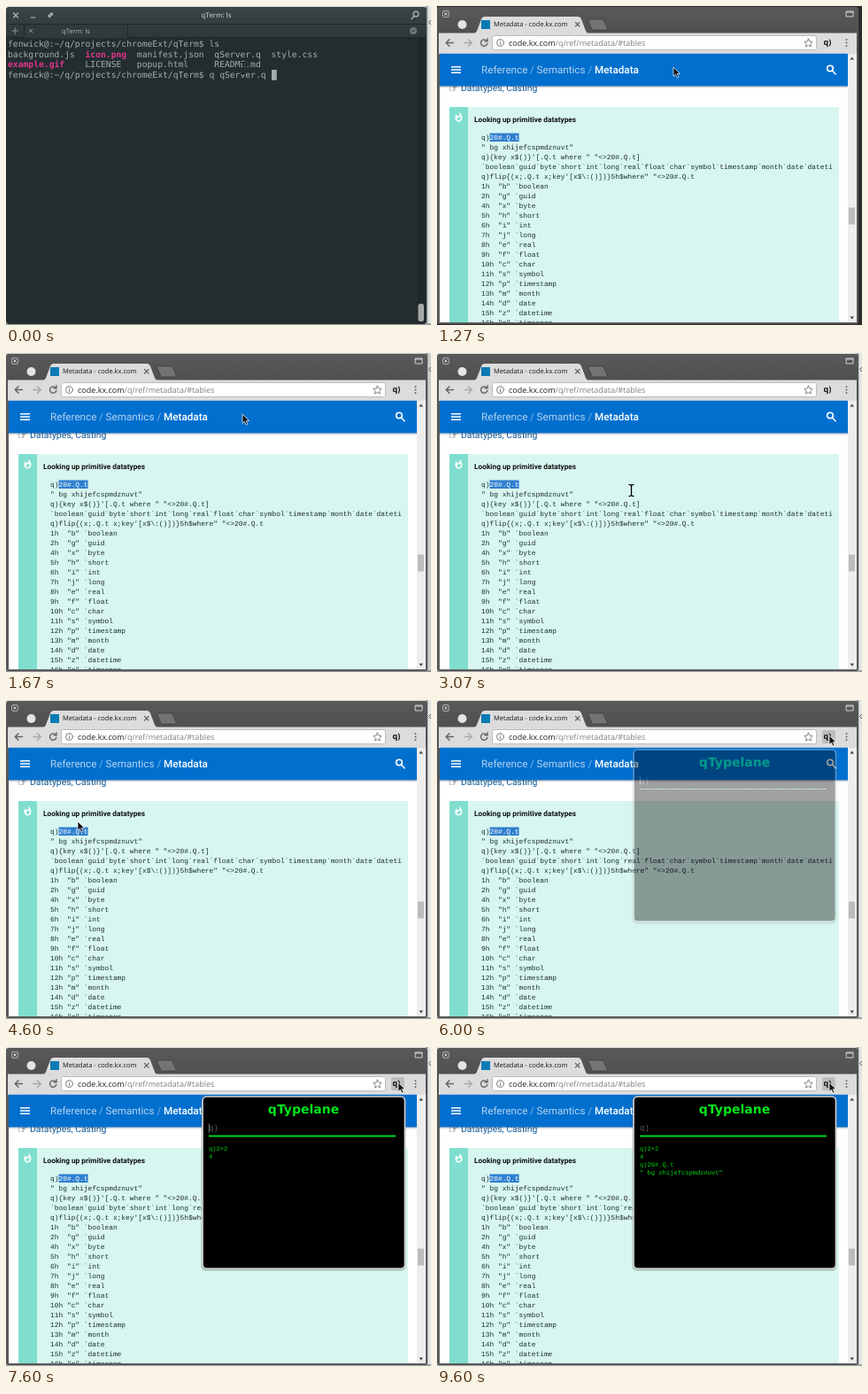
An HTML page for the animation above (9.99 s loop, 480x360 px).

```html
<!DOCTYPE html>
<html lang="en">
<head>
<meta charset="utf-8">
<title>Terminal and browser</title>
<style>
html, body { margin: 0; height: 100%; overflow: hidden; background: #e4e6e6; }
svg { display: block; width: 480px; height: 360px; }
text { white-space: pre; text-rendering: geometricPrecision; }
.ui { font-family: "Open Sans", sans-serif; }
.doc { font-family: Roboto, sans-serif; }
.term { font: 9.7px "DejaVu Sans Mono", monospace; fill: #a3adab; }
.code { font: 7.88px "Liberation Mono", monospace; fill: #1f2d33; }
.out { font: 7.12px "Liberation Mono", monospace; fill: #00d812; }
.line { fill: none; stroke-linecap: round; }
</style>
</head>
<body>
<svg viewBox="0 0 480 360">
  <defs>
    <linearGradient id="bar" x2="0" y2="1"><stop stop-color="#3b4546"/><stop offset="1" stop-color="#2d3739"/></linearGradient>
    <linearGradient id="frame" x2="0" y2="1"><stop stop-color="#595959"/><stop offset="1" stop-color="#484848"/></linearGradient>
    <linearGradient id="shade" x2="0" y2="1"><stop stop-opacity=".25"/><stop offset="1" stop-opacity="0"/></linearGradient>
    <clipPath id="codeBox"><path d="M42 114H446.500V357H42z"/></clipPath>
    <path id="beamShape" d="M-2.500-6.500Q0-6.500 0-5V5Q0 6.500-2.500 6.500M2.500-6.500Q0-6.500 0-5M0 5Q0 6.500 2.500 6.500"/>
  </defs>
  <rect width="480" height="360" fill="#e4e6e6"/>
  <path d="M474 0h2.500v360h-2.500zM0 358h480v2H0z" fill="#9da1a1"/>
  <path d="M480 16l-2.500 2.500 2.500 2.500" class="line" stroke="#555"/>
  <rect id="backdrop" width="480" height="360" fill="#2b2b2b"/>

  <g id="terminal">
    <rect y="1" width="475" height="358" rx="4" fill="#232d30"/>
    <path d="M0 36V5Q0 1 4 1H471Q475 1 475 5V36z" fill="url(#bar)"/>
    <path d="M0 20.500H475M0 35.500H20M137.500 35.500H475M20.500 21V36M137.500 21V36" stroke="#1f2829" fill="none"/>
    <path d="M21 21h116v15H21z" fill="#303a3c"/>
    <g class="line" stroke="#b4bab8" stroke-width="1.200">
      <path d="M8.500 8l5 5M13.500 8l-5 5M28 13h5M48.500 12l3.500-3.500M50 8.300h2.200v2.200M48.300 10v2.200h2.200"/>
      <circle cx="463" cy="9" r="2.900"/><path d="M461 11.500l-3 3"/>
      <path stroke="#8b9391" stroke-width="1" d="M7 28h6.500M10.200 25v6.500M26 26l4 4M30 26l-4 4"/>
    </g>
    <circle cx="460" cy="28" r="4" fill="#707877"/><path d="M458 27l2 2 2-2" class="line" stroke="#303a3c"/>
    <g class="ui" fill="#b4bab8" text-anchor="middle">
      <text id="title" x="237.500" y="13.300" font-size="7.800" font-weight="600"></text>
      <text id="tab" x="79" y="30.600" font-size="7.500"></text>
    </g>
    <path d="M465 36h9v321h-9z" fill="#1f282b"/>
    <rect x="465.500" y="336" width="6.500" height="20" rx="2.500" fill="#a4a9a8"/>
    <g id="shell" class="term"></g>
    <rect id="block" width="5.800" height="11.700" fill="#a3adab"/>
  </g>

  <g id="browser">
    <rect y="1" width="476" height="358" rx="3" fill="#595959"/>
    <rect x="1" y="2" width="474" height="52" rx="3" fill="url(#frame)"/>
    <g class="line" stroke="#d0d0d0">
      <rect x="6.500" y="5.500" width="7" height="7" rx="1.500" stroke="#aaa"/><path d="M8.500 7.500l3 3M11.500 7.500l-3 3"/>
      <path d="M462.500 6h7.500v6h-7.500zM462.500 7h7.500"/>
    </g>
    <circle cx="28.500" cy="21" r="5" fill="#e4e4e4"/>
    <path d="M172 15h14q1.500 0 2 1l4 9q.5 2-1 2h-14q-1.500 0-2-1l-4-9q-.5-2 1-2z" fill="#747474" stroke="#3c3c3c" stroke-width=".7"/>
    <path d="M41 31q3 0 4-3l5-13q1-3 4-3H159q3 0 4 3l5 13q1 3 4 3z" fill="#dcdcdc"/>
    <path d="M2 30.500H474V54H2z" fill="#dcdcdc"/>
    <rect x="50" y="16" width="10" height="10" fill="#0b7bb5"/>
    <text class="ui" x="64" y="23.300" font-size="7.500" fill="#1a1a1a">Metadata - code.kx.com</text>
    <g class="line" stroke="#666" stroke-width="1.200">
      <path d="M156.500 18.500l4.500 4.500M161 18.500l-4.500 4.500"/>
      <path d="M18.500 41.500h-8M14 37.800l-3.700 3.700 3.700 3.700" stroke-width="1.500"/>
      <path d="M31 41.500h8M35.500 37.800l3.700 3.700-3.700 3.700" stroke="#aaa" stroke-width="1.500"/>
      <path d="M56.300 39.500a3.700 3.700 0 1 0 .5 3M57 36.800v3h-3" stroke-width="1.400"/>
    </g>
    <rect x="62.500" y="33.500" width="366" height="16" rx="2" fill="#fff" stroke="#bcbcbc"/>
    <g class="line" stroke="#777"><circle cx="71.500" cy="41.500" r="4"/><path d="M71.500 41.300v2.200M71.500 39.400v.1"/></g>
    <text class="ui" x="81" y="44.700" font-size="9" fill="#222">code.kx.com<tspan fill="#808080">/q/ref/metadata/#tables</tspan></text>
    <path d="M419.500 37l1.400 3 3.300.4-2.400 2.300.6 3.300-2.900-1.600-2.900 1.600.6-3.300-2.400-2.300 3.300-.4z" class="line" stroke="#777" stroke-width=".9"/>
    <rect id="pressed" x="435" y="34" width="15" height="15" rx="2" fill="#bdbdbd"/>
    <text class="ui" x="436.500" y="44.300" font-size="9" font-weight="700" fill="#111">q)</text>
    <g fill="#666"><circle cx="462.500" cy="38" r="1"/><circle cx="462.500" cy="41.500" r="1"/><circle cx="462.500" cy="45" r="1"/></g>

    <path d="M3 54H464V357H3z" fill="#fff"/>
    <path d="M464 54H474V357H464z" fill="#ededed"/>
    <path d="M465 227.500h7v19h-7z" fill="#bcbcbc"/>
    <path d="M466.500 60.500l2.300-3 2.300 3zM466.500 350.500l2.300 3 2.300-3z" fill="#444"/>
    <text x="13" y="97" font-size="13" font-family="DejaVu Sans, sans-serif" fill="#111">☞</text>
    <text class="doc" x="27" y="96.300" font-size="10.400" fill="#125a96">Datatypes, Casting</text>
    <path d="M3 53.700H464V90.400H3z" fill="#006fce"/>
    <path d="M3 90.400H464V93H3z" fill="url(#shade)"/>
    <path d="M16 68h11v1.500H16zM16 71.300h11v1.500H16zM16 74.600h11v1.500H16z" fill="#fff"/>
    <g class="line" stroke="#fff" stroke-width="1.600"><circle cx="444" cy="70.500" r="3.300"/><path d="M446.500 73l3.500 3.800"/></g>
    <g class="doc" font-size="11.700" fill="#b3d4f0">
      <text x="50" y="76">Reference</text><text x="105" y="76" opacity=".7">/</text>
      <text x="112.500" y="76">Semantics</text><text x="170.500" y="76" opacity=".7">/</text>
      <text x="178" y="76" fill="#fff" font-weight="500">Metadata</text>
    </g>
    <path d="M14 114H454V357H14z" fill="#d7f6ef"/>
    <path d="M14 114H35V357H14z" fill="#80decf"/>
    <path transform="translate(18.500 119.500) scale(.5)" fill="#fff" d="M13.500.67s.74 2.650.74 4.800c0 2.060-1.350 3.730-3.410 3.730-2.070 0-3.630-1.670-3.630-3.730l.03-.36C5.210 7.510 4 10.620 4 14c0 4.420 3.580 8 8 8s8-3.580 8-8C20 8.610 17.410 3.800 13.500.67zM11.710 19c-1.780 0-3.220-1.400-3.220-3.140 0-1.620 1.050-2.760 2.810-3.120 1.770-.36 3.600-1.210 4.620-2.580.39 1.290.59 2.650.59 4.040 0 2.650-2.150 4.800-4.800 4.800z"/>
    <text class="doc" x="42" y="130.500" font-size="8.300" font-weight="700" fill="#111">Looking up primitive datatypes</text>
    <g clip-path="url(#codeBox)">
      <rect id="mark" y="143.500" height="9.500" fill="#2f7fcf"/>
      <g id="code" class="code"></g>
    </g>

    <g id="popup">
      <rect x="220.500" y="55.500" width="231" height="197" rx="5" opacity=".22"/>
      <rect x="222" y="56" width="228.500" height="194" rx="4.500" stroke="#d0d0d0" stroke-width="1.700"/>
      <text x="336" y="74.500" text-anchor="middle" font-family="DejaVu Sans, sans-serif" font-weight="700" font-size="14" fill="#00e61a">qTypelane</text>
      <text id="field" x="229" y="94.300" font-size="9" font-family="Liberation Mono, monospace"></text>
      <path id="caret" d="M0 86.500V96.500" stroke="#8a9a8a" stroke-width=".9"/>
      <path id="rule" d="M229 100.500H440"/>
      <g id="out" class="out"></g>
    </g>
  </g>

  <path id="arrow" d="M0 0V10.300L2.400 8.200 4.100 12 5.900 11.200 4.200 7.500H7.500z" fill="#111" stroke="#fff" stroke-width=".7"/>
  <g id="beam" class="line">
    <use href="#beamShape" stroke="#fff" stroke-width="2.200" opacity=".35"/>
    <use href="#beamShape" stroke="#000" stroke-width="1.300"/>
  </g>
</svg>
<script>
const LOOP = 9990, STEP = 200 / 3, TERM_W = 5.843, TERM_H = 11.7, CODE_W = 4.73;
const $ = id => document.getElementById(id);
const escape = s => s.replace(/&/g, '&amp;').replace(/</g, '&lt;');
const clamp = k => Math.min(1, Math.max(0, k));
const rows = (lines, x, y, pitch) =>
  lines.map((s, i) => `<text x="${x}" y="${y + i * pitch}">${s}</text>`).join('');
const show = (id, on) => $(id).style.display = on ? '' : 'none';
const place = (id, x, y) => $(id).setAttribute('transform', `translate(${x} ${y})`);
const pink = s => `<tspan fill="#e0358a" font-weight="700">${s}</tspan>`;

const prompt = 'fenwick@:~/q/projects/chromeExt/qTerm$ ';
const shellLines = [
  prompt + 'ls',
  `background.js  ${pink('icon.png')}  manifest.json  qServer.q  style.css`,
  `${pink('example.gif')}    LICENSE   popup.html     README.md`,
  prompt + 'q qServer.q ',
  'KDB+ 3.5 2017.04.10 Copyright (C) 1993-2017 Kx Systems',
  'l32/ 4()core 7870MB fenwick fenwick-laptop 127.0.1.1 NONEXPIRE',
  '',
  'Welcome to kdb+ 32bit edition',
  'For support please see http://groups.google.com/d/forum/personal-kdbplus',
  'Tutorials can be found at http://code.kx.com/wiki/Tutorials',
  'To exit, type \\\\',
  'To remove this startup msg, edit q.q',
  'q)'
];

const types = 'boolean guid byte short int long real float char symbol timestamp month date datetime timespan'.split(' ');
const typeIds = [1, 2, 4, 5, 6, 7, 8, 9, 10, 11, 12, 13, 14, 15, 16];
const codeLines = [
  'q)20#.Q.t',
  '" bg xhijefcspmdznuvt"',
  'q){key x$()}\'[.Q.t where " "<>20#.Q.t]',
  types.map(s => '`' + s).join(''),
  'q)flip{(x;.Q.t x;key\'[x$\\:()])}5h$where" "<>20#.Q.t',
  ...types.map((s, i) => `${(typeIds[i] + 'h').padEnd(4)}"${'bgxhijefcspmdzn'[i]}" \`${s}`)
].map(escape);

$('code').innerHTML = rows(codeLines, 50, 150.8, 11.03);
$('code').firstChild.innerHTML = 'q)<tspan id="chosen">20#.Q.t</tspan>';

// Pointer path: time, x, y
const path = [
  [0, 267, 69], [2470, 267, 69], [2670, 310, 82], [2800, 336, 112], [3070, 220, 155],
  [3300, 56, 166], [3470, 88, 150.5], [3730, 64, 149.5], [4540, 64, 149.5], [4604, 81, 137],
  [4735, 265, 88], [4870, 414, 57], [5004, 414, 57], [5135, 431, 53], [5204, 431, 53],
  [5535, 443, 40], [LOOP, 443, 40]
];
function pointer(t) {
  const i = Math.max(1, path.findIndex(p => p[0] >= t));
  const [t0, x0, y0] = path[i - 1], [t1, x1, y1] = path[i];
  const k = (t - t0) / (t1 - t0);
  return [x0 + (x1 - x0) * k, y0 + (y1 - y0) * k];
}

const typed = [[0, ''], [7200, '2'], [7330, '2+'], [7400, '2+2'], [7530, ''], [8470, '20#.Q.t'], [9000, '']];
const output = [[7530, 'q)2+2'], [7600, '4'], [9000, 'q)20#.Q.t'], [9070, '" bg xhijefcspmdznuvt"']];

function drawTerminal(t) {
  const title = t < 130 ? 'qTerm: ls' : 'qTerm: q';
  $('title').textContent = $('tab').textContent = title;
  const count = t < 200 ? 4 : t < 270 ? 12 : 13;
  $('shell').innerHTML = rows(shellLines.slice(0, count), 2, 45.9, TERM_H);
  const [col, row] = t < 130 ? [51, 3] : t < 200 ? [0, 4] : t < 270 ? [0, 12] : [2, 12];
  place('block', 2 + col * TERM_W, 36.9 + row * TERM_H);
  show('block', t < 730);
}

function drawPopup(t) {
  show('pressed', t >= 5930);
  $('popup').style.opacity = clamp((t - 5930) / 200);
  const value = typed.filter(p => p[0] <= t).pop()[1];
  $('field').textContent = value || 'q)';
  $('field').setAttribute('fill', value ? '#00d812' : '#5c645f');
  place('caret', 229.3 + value.length * 5.4, 0);
  show('caret', !(t >= 6930 && t < 7200 || t >= 8130 && t < 8470 || t >= 9600));
  const ready = t >= 6530;
  $('rule').setAttribute('stroke', ready ? '#00d51a' : '#5fe0bd');
  $('rule').setAttribute('stroke-width', ready ? 1.8 : 1.2);
  $('rule').setAttribute('stroke-dasharray', ready ? 'none' : '1.8 .8');
  $('out').innerHTML = rows(output.filter(p => p[0] <= t).map(p => escape(p[1])), 229, 116.6, 9.1);
}

function draw(now) {
  const t = Math.floor((now % LOOP + 4) / STEP) * STEP + 4;
  const browsing = t >= 1270;
  show('terminal', !browsing);
  show('browser', browsing);
  $('backdrop').style.opacity = browsing ? clamp((1730 - t) / 460) : 0;
  if (browsing) drawPopup(t); else drawTerminal(t);

  const [x, y] = pointer(Math.min(t, LOOP));
  const overText = !browsing || t > 2600 && t < 4600 && y > 141;
  show('arrow', !overText);
  show('beam', overText);
  place('arrow', x, y);
  place('beam', x + (browsing ? 0 : 1), y + (browsing ? 0 : 1));

  const dragging = t >= 3470 && t < 3730;
  const chars = dragging ? Math.max(0, Math.round((92.5 - x) / CODE_W)) : 7;
  $('mark').setAttribute('x', 92.6 - chars * CODE_W);
  $('mark').setAttribute('width', chars * CODE_W);
  $('chosen').innerHTML = '20#.Q.t'.slice(0, 7 - chars) + `<tspan fill="#fff">${'20#.Q.t'.slice(7 - chars)}</tspan>`;
}

const start = performance.now();
function tick() {
  draw(performance.now() - start);
  requestAnimationFrame(tick);
}
tick();
</script>
</body>
</html>
```
